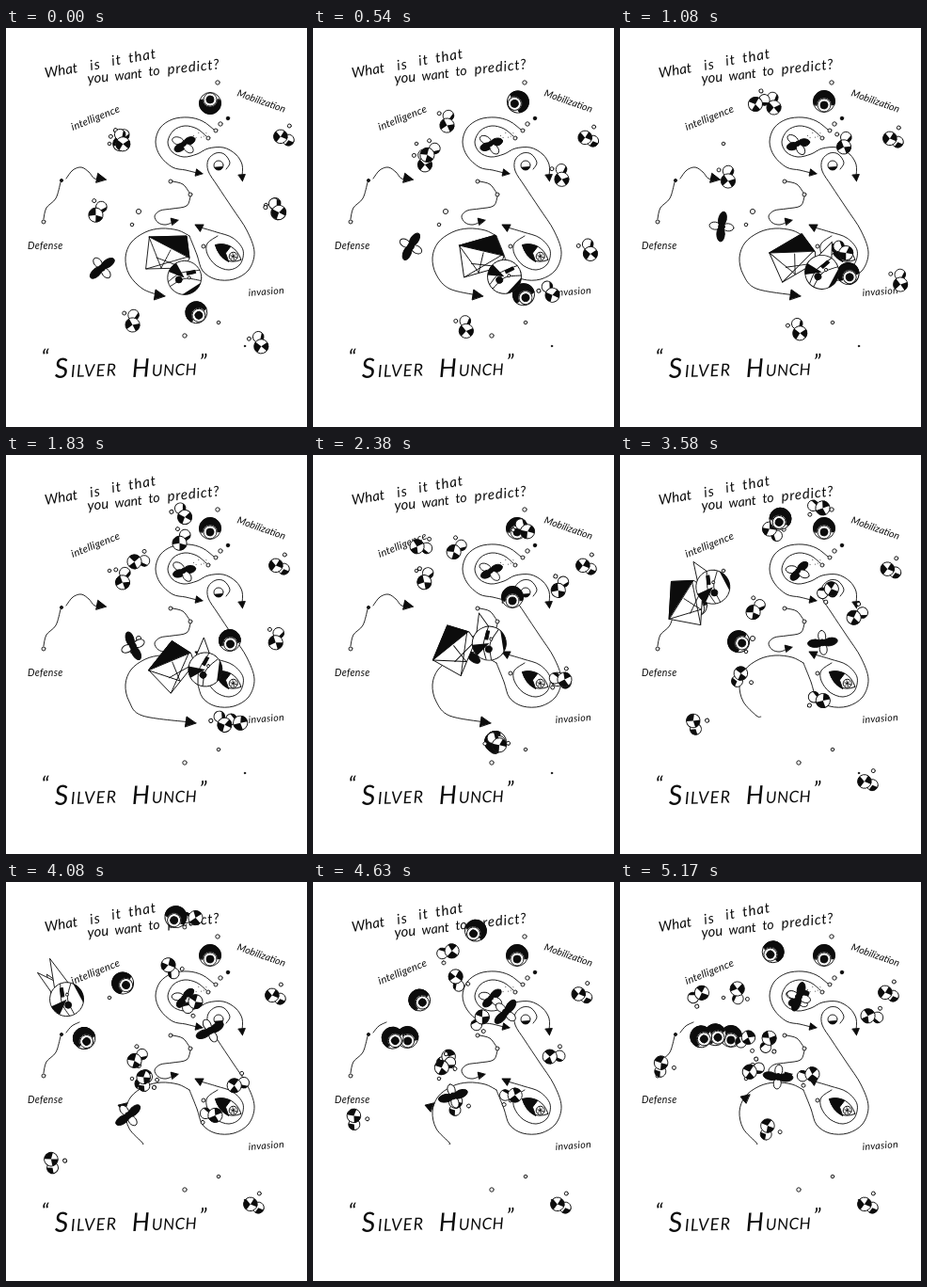
Write an HTML page with a canvas that moves like this. It is 320x424 px and loops after 5210 ms.

```html
<!DOCTYPE html>
<html lang="en">
<head>
<meta charset="utf-8">
<title>Silver Hunch</title>
<style>
html, body { margin: 0; width: 100%; height: 100%; overflow: hidden; background: #fff; }
canvas { display: block; width: 320px; height: 424px; }
</style>
</head>
<body>
<canvas id="stage"></canvas>
<script>
const W = 320, H = 424, LOOP = 5210, FPS = 24;
const INK = '#0c0c0c', PAPER = '#fff', TAU = Math.PI * 2;
const HAND = 'Lato, "Open Sans", sans-serif';
const canvas = document.getElementById('stage');
const g = canvas.getContext('2d');
const dpr = window.devicePixelRatio || 1;
canvas.width = W * dpr;
canvas.height = H * dpr;

// ---- drawing helpers ----
function paint(fill, line = true) {
  if (fill) { g.fillStyle = fill; g.fill(); }
  if (line) g.stroke();
}
function disc(x, y, r, fill = PAPER) {
  g.beginPath();
  g.arc(x, y, r, 0, TAU);
  paint(fill);
}
function oval(x, y, rx, ry, turn, fill) {
  g.beginPath();
  g.ellipse(x, y, rx, ry, turn, 0, TAU);
  paint(fill);
}
function poly(pts, fill) {
  g.beginPath();
  pts.forEach(p => g.lineTo(p[0], p[1]));
  g.closePath();
  paint(fill);
}
function wedge(x, y, r, from, to) {
  g.beginPath();
  g.moveTo(x, y);
  g.arc(x, y, r, from, to);
  paint(INK, false);
}
function cap(x, y, r, from, to) {
  g.beginPath();
  g.arc(x, y, r, from, to);
  paint(INK, false);
}
function curve(...v) {
  const n = v.length / 2;
  const at = i => { const j = 2 * Math.max(0, Math.min(n - 1, i)); return [v[j], v[j + 1]]; };
  g.beginPath();
  g.moveTo(v[0], v[1]);
  for (let i = 0; i < n - 1; i++) {
    const a = at(i - 1), b = at(i), c = at(i + 1), d = at(i + 2);
    g.bezierCurveTo(b[0] + (c[0] - a[0]) / 6, b[1] + (c[1] - a[1]) / 6,
      c[0] - (d[0] - b[0]) / 6, c[1] - (d[1] - b[1]) / 6, c[0], c[1]);
  }
  g.stroke();
}
function placed(x, y, turn, draw) {
  g.save();
  g.translate(x, y);
  g.rotate(turn);
  draw();
  g.restore();
}
function arrow(x, y, turn, s = 1) {
  placed(x, y, turn, () => poly([[5 * s, 0], [-4 * s, -4.5 * s], [-4 * s, 4.5 * s]], INK));
}
function write(str, x, y, size, turn = 0, gap = 0) {
  placed(x, y, turn, () => {
    g.font = `italic ${size}px ${HAND}`;
    g.letterSpacing = gap + 'px';
    g.fillStyle = INK;
    g.fillText(str, 0, 0);
  });
}

// ---- creatures, drawn around their own centre ----
function bug() {
  disc(-10, -7, 2);
  disc(0, -6, 5.8);
  cap(0, -6, 5.8, -0.6, 1.6);
  disc(0, 4.5, 7.6);
  wedge(0, 4.5, 7.6, 2.4, 4.1);
  wedge(0, 4.5, 7.6, -0.3, 1);
}
function pair() {
  disc(4, -12, 2);
  disc(6, 3, 6);
  disc(-3, 1, 7.3);
  wedge(-3, 1, 7.3, 2, 3.8);
  wedge(-3, 1, 7.3, -1.2, 0.2);
  wedge(6, 3, 6, 0.2, 2);
}
function eye() {
  disc(0, -1, 11.5);
  g.beginPath();
  g.arc(0, -1, 11.5, Math.PI - 0.3, 0.3);
  g.arc(0, 3, 8, 0, Math.PI, true);
  g.closePath();
  paint(INK);
  disc(0, 3, 7);
  disc(0, 3, 4, INK);
}
function fly() {
  oval(-7, 0, 6, 4, 0, PAPER);
  oval(7, 0, 6, 4, 0, PAPER);
  oval(0, -8, 4.2, 8, 0.1, INK);
  oval(0, 8, 4.2, 8, -0.1, INK);
  disc(0, 0, 3.4, INK);
}
function flower() {
  oval(-6, -2, 6.5, 4, 0.3, PAPER);
  oval(6, -2, 6.5, 4, -0.4, INK);
  oval(-4, 5, 6.5, 4, -0.5, INK);
  oval(5, 6, 6, 4, 0.7, PAPER);
  disc(0, 1, 2.5, INK);
}

// ---- motion ----
const KEYS = [0, 26, 44, 57, 74, 98, 124];
function along(v, first, k, axis) {
  const last = v.length / 2 - 1;
  let i = 0;
  while (i < last - 1 && k > KEYS[first + i + 1]) i++;
  const val = j => v[2 * j + axis], key = j => KEYS[first + j];
  const slope = j => {
    const a = Math.max(0, j - 1), b = Math.min(last, j + 1);
    return (val(b) - val(a)) / (key(b) - key(a));
  };
  const span = key(i + 1) - key(i);
  const u = Math.max(0, Math.min(1, (k - key(i)) / span));
  const u2 = u * u, u3 = u2 * u, ease = 3 * u2 - 2 * u3;
  return val(i) * (1 - ease) + val(i + 1) * ease +
    span * 0.6 * (slope(i) * (u3 - 2 * u2 + u) + slope(i + 1) * (u3 - u2));
}
const cast = [];
const add = (draw, first, turn, spin, ...path) => cast.push({ draw, first, turn, spin, path });

// late joiners start underneath another creature
add(eye, 5, -1.2, 0.01, 83, 167, 118, 165);
add(bug, 0, 0.4, -0.02, 123, 119, 163, 80, 188, 62, 225, 78, 218, 79, 197, 38, 83, 120);
add(bug, 0, -0.3, 0.02, 288, 192, 239, 122, 187, 90, 153, 100, 143, 75);
add(pair, 3, 0.5, 0.015, 195, 305, 115, 262, 148, 210, 135, 168);
add(pair, 4, 0.2, 0.01, 115, 262, 50, 297, 45, 195);
add(pair, 5, 0.3, 0.01, 148, 210, 158, 262);
add(pair, 3, 0.2, 0, 263, 238, 263, 342, 263, 342, 263, 342);
add(eye, 3, -2, 0.01, 195, 305, 133, 297, 125, 108, 102, 163);
add(fly, 0, 0.9, -0.03, 102, 255, 108, 211, 135, 203, 165, 210, 208, 237, 217, 158, 190, 122);
add(fly, 5, 1.1, 0.03, 130, 248, 168, 207);
add(bug, 0, -0.3, 0.012, 123, 119, 115, 158, 125, 131, 120, 131, 147, 140, 140, 187, 142, 200);
add(pair, 0, 0.2, 0, 295, 115, 290, 117, 290, 117, 290, 117, 289, 121, 286, 120, 285, 117);
add(bug, 0, -0.5, 0.018, 288, 192, 298, 268, 288, 195, 263, 140, 260, 121, 247, 215, 268, 143);
add(bug, 0, 0.6, 0.02, 98, 195, 148, 79, 141, 113, 115, 98, 143, 75, 175, 92, 125, 118);
add(bug, 0, -0.3, -0.02, 270, 334, 237, 236, 245, 283, 263, 238, 243, 168, 198, 130, 157, 170);
add(bug, 0, 0.1, -0.015, 135, 311, 190, 320, 230, 283, 195, 305, 203, 272, 218, 247, 200, 205);
add(eye, 0, -0.7, 0.012, 203, 303, 243, 262, 238, 198, 212, 152, 163, 107, 180, 38, 162, 75);
add(eye, 3, 0.6, -0.012, 152, 207, 85, 158, 84, 167, 87, 165);

// ---- the large traveller: faceted body with a round head ----
const bodyPath = [172, 240, 185, 245, 178, 225, 152, 207, 108, 180, 44, 137, 95, 165];
const headTurn = [0, 0, -29, 0, -50, 0, -66, 0, -81, 0, -86, 0, -60, 0];
const headGap = [31, 0, 33, 0, 34, 0, 36, 0, 39, 0, 24, 0, 30, 0];
function traveller(k) {
  if (k > 110) return;
  const turn = along(headTurn, 0, k, 0) * Math.PI / 180;
  const gap = along(headGap, 0, k, 0);
  placed(along(bodyPath, 0, k, 0), along(bodyPath, 0, k, 1), turn, () => {
    if (k < 90) {
      poly([[-20, -18], [20, -19], [23, 5], [17, 15], [-23, 16]], PAPER);
      poly([[-20, -18], [20, -19], [23, 4]], INK);
      curve(-23, 16, 22, 3);
      curve(-20, -18, -7, 15);
      curve(-7, 15, 3, -4);
      curve(-12, 4, 17, 15);
    }
    g.translate(gap * 0.574, gap * 0.819);
    if (k > 20) {
      poly([[2, -16], [25, -23], [15, -6]], PAPER);
      if (k >= 90) {
        poly([[4, -15], [26, -33], [16, -8]], PAPER);
        poly([[12, -14], [42, -21], [18, 0]], PAPER);
      }
    }
    disc(0, 0, 18);
    cap(0, 0, 18, 0.3, 1.7);
    wedge(0, 0, 18, 3.5, 4.2);
    curve(-17, 4, -4, -5, 16, -8);
    curve(-15, 9, 0, 1, 17, 3);
    poly([[2, -6], [11, -8], [12, -5], [3, -3]], INK);
    disc(-6, 2, 3.5, INK);
    disc(5, 0, 1.5);
  });
}

// ---- the page behind the creatures ----
function words() {
  write('What', 42, 53, 15, -0.17);
  write('is', 90, 45, 15, -0.17, 1);
  write('it', 113, 40, 15, -0.17, 1);
  write('that', 131, 37, 15, -0.17, 1);
  write('you', 87, 59, 15, -0.11);
  write('want', 116, 56, 14, -0.11);
  write('to', 152, 51, 14, -0.11);
  write('predict?', 172, 49, 15, -0.1, 0.8);
  write('intelligence', 71, 109, 11, -0.38, 0.3);
  write('Mobilization', 245, 72, 10.5, 0.34);
  write('Defense', 23, 235, 10.5, 0, 0.3);
  write('invasion', 258, 285, 10.5, -0.08, 0.3);
  write('“', 38, 359, 24, -0.05);
  write('S', 52, 372, 29, -0.05);
  write('ILVER', 69, 371, 18, -0.03, 1.2);
  write('H', 134, 371, 27, -0.03);
  write('UNCH', 155, 370, 17, -0.03, 0.5);
  write('”', 206, 364, 24, -0.05);
}
const tipX = [163, 0, 186, 0, 196, 0, 183, 0, 157, 0, 145, 0, 145, 0];
function sweep(k) {
  const x = along(tipX, 0, k, 0);
  const late = k >= 86;
  curve(195, 221, 183, 215, 165, 213, 148, 217, 133, 228, 127, 244, 131, 262, 145, 277,
    x, late ? 278 : 284);
  if (late) arrow(k < 112 ? 125 : 134, k < 112 ? 238 : 229, -0.7);
  else arrow(x, 284, 0.15, 1.2);
}
function paths(k) {
  curve(40, 203, 43, 191, 53, 181, 58, 164);
  disc(40, 206, 2);
  disc(59, 162, 1.6, INK);
  if (k < 66) {
    curve(64, 160, 71, 151, 80, 148, 88, 153, 94, 160, 101, 160);
    arrow(101, 160, 0.2, 1.1);
  } else {
    curve(64, 160, 70, 153, 78, 149);
  }
  // double loop at the top
  curve(221, 108, 209, 99, 194, 95, 177, 97, 164, 106, 159, 121, 164, 136, 177, 148, 191, 151, 203, 154);
  disc(223, 109, 2);
  arrow(205, 154, 0.2, 0.8);
  curve(213, 115, 203, 107, 190, 104, 178, 109, 172, 121, 177, 132, 189, 137, 203, 134, 215, 128,
    231, 127, 244, 134, 251, 145, 251, 158);
  disc(215, 117, 2);
  arrow(251, 159, 1.5, 0.8);
  // long line down around the leaf
  curve(234, 150, 238, 143, 232, 134, 223, 133, 215, 140, 215, 152, 225, 168, 241, 192, 256, 215,
    264, 238, 258, 257, 242, 267, 223, 267, 209, 258, 203, 241, 195, 221);
  curve(207, 212, 224, 217, 241, 223, 252, 236, 249, 251, 237, 257, 223, 252, 214, 240, 214, 229, 225, 221);
  arrow(205, 211, 3.6, 0.9);
  disc(210, 232, 2);
  // middle squiggle
  curve(177, 163, 188, 166, 195, 175);
  curve(196, 179, 192, 189, 177, 192, 164, 194, 158, 200, 162, 207, 170, 209, 178, 206);
  disc(175, 163, 2);
  disc(196, 177, 2);
  arrow(179, 205, -0.2, 0.8);
  sweep(k);
}
function leaves() {
  placed(236, 241, 0.3, () => {
    g.beginPath();
    g.moveTo(-16, -6);
    g.quadraticCurveTo(2, -16, 15, 1);
    g.quadraticCurveTo(-2, 14, -16, -6);
    paint(PAPER);
    g.beginPath();
    g.moveTo(-16, -6);
    g.quadraticCurveTo(-8, -11, 0, -9);
    g.lineTo(-3, -1);
    g.lineTo(3, 7);
    g.quadraticCurveTo(-9, 5, -16, -6);
    paint(INK);
    disc(6, 0, 4.5);
    for (let i = 0; i < 3; i++) {
      const c = 3 * Math.cos(i * TAU / 6), s = 3 * Math.sin(i * TAU / 6);
      curve(6 - c, -s, 6 + c, s);
    }
  });
  disc(226, 146, 5);
  cap(226, 146, 5, 0.2, 2.8);
}
function specks() {
  disc(225, 58, 2.2);
  disc(236, 96, 1.8, INK);
  disc(228, 102, 2.2);
  disc(141, 195, 2.6);
  disc(134, 209, 1.8);
  disc(110, 123, 1.8);
  disc(226, 313, 1.8);
  disc(190, 327, 2.2);
  disc(254, 338, 0.8, INK);
  for (let i = 0; i < 6; i++) {
    g.fillStyle = INK;
    g.fillRect(199 + i * 2.7, 114 + 3 * Math.sin(i * 2.3), 0.8, 0.8);
  }
}

function draw(k) {
  g.setTransform(dpr, 0, 0, dpr, 0, 0);
  g.fillStyle = PAPER;
  g.fillRect(0, 0, W, H);
  g.strokeStyle = INK;
  g.lineWidth = 0.9;
  g.lineJoin = g.lineCap = 'round';
  words();
  paths(k);
  leaves();
  specks();
  placed(189, 122, Math.sin(k / 20) * 0.3, flower);
  placed(217, 79, Math.PI * Math.max(0, 1 - k / 20), eye);
  for (const c of cast) {
    const end = KEYS[c.first + c.path.length / 2 - 1];
    if (k < KEYS[c.first] || k > end) continue;
    placed(along(c.path, c.first, k, 0), along(c.path, c.first, k, 1), c.turn + c.spin * k, c.draw);
  }
  traveller(k);
}

const start = performance.now();
function tick(now) {
  const t = Math.max(0, now - start) % LOOP;
  draw(Math.min(124, Math.floor((t + 5) * FPS / 1000)));
  requestAnimationFrame(tick);
}
draw(0);
requestAnimationFrame(tick);
</script>
</body>
</html>
```
